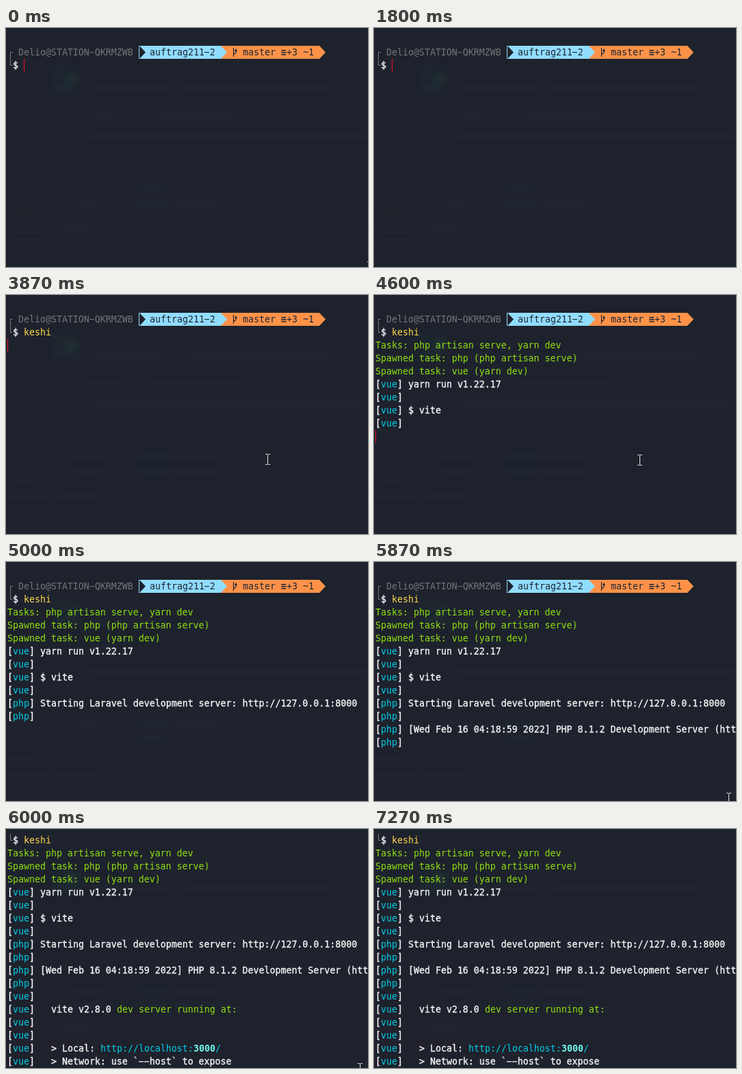
An HTML page with a canvas that plays this animation: 529 by 349 pixels, repeating every 8590 ms.

```html
<!DOCTYPE html>
<html lang="en">
<head>
<meta charset="utf-8">
<title>Terminal session</title>
<style>
html, body { margin: 0; width: 100%; height: 100%; overflow: hidden; background: #1e222d; }
canvas { display: block; }
</style>
</head>
<body>
<canvas id="stage" width="529" height="349"></canvas>
<script>
const W = 529, H = 349, LOOP = 8590;
const CELL = 8, LINE = 19, LEFT = 2, TOP = 7, FIRST = 26;
const BG = '#1e222d', WHITE = '#f4f4f4', GREY = '#757575', GREEN = '#8fe010', CYAN = '#00cfe6',
  AQUA = '#6ff5ee', YELLOW = '#ffd84a', BLUE = '#91ddff', ORANGE = '#ff9248', INK = '#1b2333', RED = '#f50f1e';
const FAMILY = '"DejaVu Sans Mono", "Noto Sans Mono", monospace';

const ctx = document.getElementById('stage').getContext('2d');

// A run is [text, colour, weight]; runs follow each other on the cell grid.
const tag = (name, ...runs) => [['[', WHITE, 500], [name, CYAN], ['] ', WHITE, 500], ...runs];
const vue = (...runs) => tag('vue', ...runs);
const php = (...runs) => tag('php', ...runs);
const plain = text => [text, WHITE, 500];

const log = [
  [4270, [['Tasks: php artisan serve, yarn dev', GREEN]]],
  [4270, [['Spawned task: php (php artisan serve)', GREEN]]],
  [4270, [['Spawned task: vue (yarn dev)', GREEN]]],
  [4470, vue(plain('yarn run v1.22.17'))],
  [4470, vue()],
  [4600, vue(plain('$ vite'))],
  [4600, vue()],
  [5000, php(plain('Starting Laravel development server: http://127.0.0.1:8000'))],
  [5000, php()],
  [5200, php(plain('[Wed Feb 16 04:18:59 2022] PHP 8.1.2 Development Server (http'))],
  [5200, php()],
  [5930, vue()],
  [5930, vue(plain('  vite v2.8.0 '), ['dev server running at:', GREEN])],
  [5930, vue()],
  [5930, vue()],
  [5930, vue(plain('  > Local: '), ['http://localhost:', CYAN], ['3000', AQUA, 700], ['/', CYAN])],
  [6000, vue(plain('  > Network: use `--host` to expose'))]
];

const command = 'keshi';
const keyTimes = [2730, 3070, 3330, 3470, 3670];
const ENTER = 3870, CURSOR_OFF = 5000;

// Pointer path: [tick, x, y] at 15 ticks per second.
const path = [
  [0, 531, 349], [26, 531, 349], [27, 545, 352], [28, 545, 352], [29, 486, 306],
  [30, 430, 268], [31, 395, 247], [32, 382, 240], [67, 382, 240], [69, 388, 241],
  [70, 402, 250], [74, 505, 330], [75, 535, 352], [82, 540, 349], [83, 526, 345],
  [84, 520, 345], [86, 520, 345], [88, 518, 345], [89, 517, 345], [90, 517, 350],
  [91, 520, 370], [104, 495, 370], [105, 491, 346], [107, 463, 316], [109, 480, 375], [130, 480, 375]
];

// Weight 500 is regular type thickened by a fine outline.
function text(str, x, y, color, weight = 400) {
  const glyphs = str.replace(/-/g, '\u2212');
  ctx.font = `${weight === 700 ? 700 : 400} 13.2885px ${FAMILY}`;
  ctx.fillStyle = ctx.strokeStyle = color;
  ctx.fillText(glyphs, x, y + 14);
  if (weight === 500) {
    ctx.lineWidth = 0.35;
    ctx.strokeText(glyphs, x, y + 14);
  }
}

function runs(list, col, y) {
  for (const [str, color, weight] of list) {
    text(str, LEFT + col * CELL, y, color, weight);
    col += str.length;
  }
}

function rect(x, y, w, h, color) {
  ctx.fillStyle = color;
  ctx.fillRect(x, y, w, h);
}

function arrow(x, y, color) {
  ctx.fillStyle = color;
  ctx.beginPath();
  ctx.moveTo(x, y);
  ctx.lineTo(x + CELL + 1, y + LINE / 2);
  ctx.lineTo(x, y + LINE);
  ctx.fill();
}

function branch(x, y) {
  ctx.strokeStyle = ctx.fillStyle = INK;
  ctx.lineWidth = 1.2;
  ctx.beginPath();
  ctx.moveTo(x + 2.5, y + 3);
  ctx.lineTo(x + 2.5, y + 16);
  ctx.moveTo(x + 2.5, y + 13);
  ctx.lineTo(x + 6, y + 10);
  ctx.lineTo(x + 6, y + 6);
  ctx.stroke();
  ctx.beginPath();
  ctx.moveTo(x + 4, y + 8);
  ctx.lineTo(x + 6, y + 4);
  ctx.lineTo(x + 8, y + 8);
  ctx.fill();
}

function prompt(y) {
  rect(6, y + 9, 1, 10, GREY);
  rect(6, y + 9, 4, 1, GREY);
  text('Delio@STATION-QKRMZWB', 18, y, GREY);
  rect(194, y, 120, LINE, BLUE);
  arrow(195, y, BG);
  text('auftrag211-2', 210, y, INK);
  rect(314, y, 144, LINE, ORANGE);
  arrow(314, y, BLUE);
  branch(330, y);
  text('master', 346, y, INK);
  text('\u2261', 402, y, INK, 700);
  text('+3 ~1', 410, y, INK);
  arrow(458, y, ORANGE);
}

function commandLine(y, t) {
  const typed = keyTimes.filter(k => t >= k).length;
  rect(6, y, 1, 10, GREY);
  rect(6, y + 9, 4, 1, GREY);
  text('$', 10, y, WHITE, 500);
  text(command.slice(0, typed), 26, y, YELLOW);
  if (t < ENTER) rect(26 + typed * CELL, y, 1, LINE, RED);
}

function pointer(t) {
  const tick = Math.floor((t + 4) * 0.015);
  const i = path.findIndex(p => p[0] > tick);
  const [t0, x0, y0] = path[i - 1], [t1, x1, y1] = path[i];
  const k = (tick - t0) / (t1 - t0);
  const x = Math.round(x0 + (x1 - x0) * k), y = Math.round(y0 + (y1 - y0) * k);
  const c = '#e6e6e0';
  rect(x, y - 7, 1, 14, c);
  for (const edge of [y - 8, y + 7]) {
    rect(x - 3, edge, 3, 1, c);
    rect(x + 1, edge, 3, 1, c);
  }
}

// Blurred window showing faintly through the terminal.
function makeBackdrop() {
  const layer = document.createElement('canvas');
  layer.width = W;
  layer.height = H;
  const g = layer.getContext('2d');
  const box = (x, y, w, h, color) => { g.fillStyle = color; g.fillRect(x, y, w, h); };
  const smear = (x, y, end, color) => box(x, y - 4, end - x, 8, color);
  const pale = 'rgba(150,165,175,.03)', red = 'rgba(150,60,70,.06)', teal = 'rgba(80,170,150,.04)';
  box(0, 0, W, H, BG);
  g.filter = 'blur(4px)';
  box(67, 56, 42, 39, 'rgba(30,52,52,.3)');
  box(88, 68, 16, 12, 'rgba(90,140,130,.1)');
  box(72, 82, 22, 8, 'rgba(90,140,130,.06)');
  smear(125, 88, 240, pale);
  smear(260, 88, 480, pale);
  smear(120, 128, 170, pale);
  smear(210, 128, 345, pale);
  smear(120, 159, W, pale);
  for (const y of [236, 257]) {
    smear(95, y, 145, pale);
    smear(190, y, 240, teal);
    smear(240, y, 312, pale);
  }
  smear(4, 269, 46, red);
  smear(0, 292, 60, red);
  smear(75, 292, 130, pale);
  smear(0, 314, 155, red);
  return layer;
}

const backdrop = makeBackdrop();

function draw(t) {
  ctx.drawImage(backdrop, 0, 0);
  const shown = log.filter(entry => t >= entry[0]);
  const count = shown.length + 2;
  const top = FIRST - Math.max(0, count - 17) * LINE;

  ctx.save();
  ctx.beginPath();
  ctx.rect(0, TOP, W, H - TOP);
  ctx.clip();
  prompt(top);
  commandLine(top + LINE, t);
  shown.forEach((entry, i) => runs(entry[1], 0, top + (i + 2) * LINE));
  if (t >= ENTER && t < CURSOR_OFF) rect(LEFT, top + count * LINE, 1, LINE, RED);
  ctx.restore();

  pointer(t);
}

const start = performance.now();
function loop() {
  draw((performance.now() - start) % LOOP);
  requestAnimationFrame(loop);
}
loop();
</script>
</body>
</html>
```
